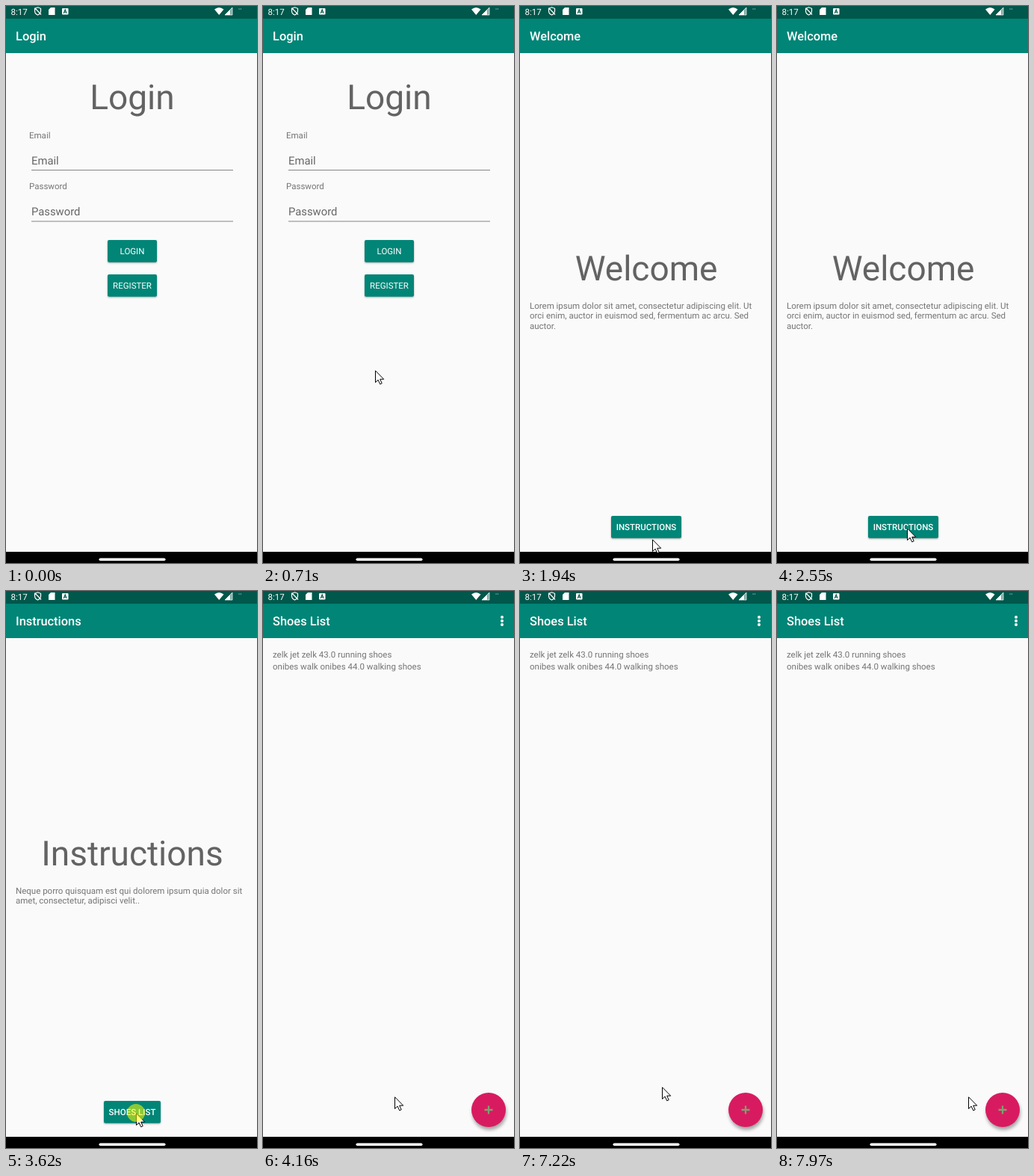
An HTML page that plays this animation: 336 px wide and 745 px high, repeating every 8 s.

```html
<!DOCTYPE html>
<html lang="en">
<head>
<meta charset="utf-8">
<title>Shoe store app</title>
<style>
  html, body { margin: 0; width: 100%; height: 100%; overflow: hidden; background: #fafafa; }
  svg { display: block; width: 336px; height: 745px; }
  text { font: 11.5px Roboto, sans-serif; fill: #757575; text-rendering: geometricPrecision; }
  .title { font-size: 16.4px; font-weight: 500; fill: #fff; }
  .headline { font-size: 46px; fill: #636363; text-anchor: middle; }
  .hint { font-size: 14.8px; fill: #666; }
  .label { fill: #fff; text-anchor: middle; }
  .raised { font-weight: 500; }
  .button { fill: #008577; filter: drop-shadow(0 1px 1px #0005); }
  .rule { stroke: #858585; }
  .fab { fill: #d81b60; filter: drop-shadow(1px 4px 2px #0005); }
</style>
</head>
<body>
<svg viewBox="0 0 336 745">
  <rect width="336" height="745" fill="#fafafa"/>
  <rect width="336" height="63" fill="#008577"/>
  <rect width="336" height="17" fill="#00574b"/>
  <rect y="730" width="336" height="15"/>
  <rect x="124.5" y="738.5" width="89" height="3.5" rx="1.75" fill="#fff"/>

  <g fill="#fff">
    <text x="6.5" y="11.5" style="fill:#fff">8:17</text>
    <path d="M42.5 1.8l4 1.5v3.5q0 3.5-4 5.2q-4-1.7-4-5.2v-3.5zM38.5 2.5l8.500 9" fill="none" stroke="#fff" stroke-width="1.2"/>
    <path d="M60 2h5.5v10h-8.500v-7z"/>
    <rect x="75" y="3" width="8.5" height="8.5" rx="1"/>
    <path d="M77.2 9.800l2-5 2 5M78 8.2h2.5" fill="none" stroke="#00574b" stroke-width="1.1"/>
    <path d="M279 4.5q6.300-5 12.500 0l-6.250 7.500z"/>
    <path d="M303 2v10h-10z" fill-opacity=".5" stroke="#fff" stroke-width=".7"/>
    <path d="M300 5v7h-7z"/>
    <path d="M311.5 4h3.5" stroke="#fff" stroke-width="2" stroke-opacity=".4" stroke-dasharray="1.2"/>
  </g>

  <g id="page"></g>
  <path id="cursor" d="M.5 .8v15.700l3.600-3.400 2.600 5.700 2.500-1.100-2.500-5.500h5z" fill="#fff" stroke="#000"/>
  <circle id="press" r="12" fill="#ff0" fill-opacity=".55"/>
</svg>
<script>
const LOOP = 8000, STEP = 70;
const MARGIN = 13, CENTER = 169, LINE = 13.4;

// Page building blocks
const text = (x, y, content, style = '') => `<text class="${style}" x="${x}" y="${y}">${content}</text>`;
const title = name => text(MARGIN, 46, name, 'title');
const paragraph = (y, gap, lines) => lines.map((line, i) => text(MARGIN, y + i * gap, line)).join('');

function button(label, y, width, style = '') {
  return `<rect class="button" x="${CENTER - width / 2}" y="${y - 15}" width="${width}" height="29.8" rx="2"/>`
    + text(CENTER, y + 4, label, 'label ' + style);
}

function field(name, y) {
  return text(31, y, name) + text(34, y + 35, name, 'hint')
    + `<path class="rule" d="M34 ${y + 43}h270"/>`;
}

function messagePage(name, lines, next, width) {
  return title(name) + text(CENTER, 366.5, name, 'headline')
    + paragraph(405, LINE, lines) + button(next, 697, width, 'raised');
}

const pages = [
  title('Login') + text(CENTER, 137.5, 'Login', 'headline')
    + field('Email', 176.5) + field('Password', 245)
    + button('LOGIN', 328, 66) + button('REGISTER', 374, 66),
  messagePage('Welcome', [
    'Lorem ipsum dolor sit amet, consectetur adipiscing elit. Ut',
    'orci enim, auctor in euismod sed, fermentum ac arcu. Sed',
    'auctor.',
  ], 'INSTRUCTIONS', 94),
  messagePage('Instructions', [
    'Neque porro quisquam est qui dolorem ipsum quia dolor sit',
    'amet, consectetur, adipisci velit..',
  ], 'SHOES LIST', 76),
  title('Shoes List')
    + '<path d="M320 35v11" stroke="#fff" stroke-width="4" stroke-linecap="round" stroke-dasharray="0 5"/>'
    + paragraph(89, 16, ['zelk jet zelk 43.0 running shoes', 'onibes walk onibes 44.0 walking shoes'])
    + '<circle class="fab" cx="302" cy="694" r="23"/>'
    + '<path d="M296.5 694h11M302 688.5v11" stroke="#80a071" stroke-width="2.3"/>',
];

// The pointer eases from target to target; bow bends the path sideways
const entry = { x: 289, y: 661 };
const legs = [
  { start: 370, end: 920, x: 177, y: 321, bow: -80 },
  { start: 1660, end: 1940, x: 177, y: 713, bow: -27 },
  { start: 2010, end: 2420, x: 174, y: 698, bow: 0 },
  { start: 3950, end: 4160, x: 176, y: 676, bow: 0 },
  { start: 5960, end: 5960, x: 178, y: 674, bow: 0 },
  { start: 7080, end: 7430, x: 200, y: 675, bow: -12 },
  { start: 7700, end: 7970, x: 256, y: 676, bow: -3 },
];
const clicks = [1120, 2480, 3620];

function pointerAt(t) {
  const index = legs.findLastIndex(leg => t >= leg.start);
  if (index < 0) return null;
  const leg = legs[index], from = legs[index - 1] ?? entry;
  const count = Math.round((leg.end - leg.start) / STEP) + 1;
  const step = t >= leg.end ? count : Math.floor((t - leg.start) / STEP) + 1;
  const p = Math.min(1, step / count), u = p * p * (3 - 2 * p);
  const dx = leg.x - from.x, dy = leg.y - from.y;
  const side = 4 * u * (1 - u) * leg.bow / Math.hypot(dx, dy);
  return [Math.round(from.x + u * dx - side * dy), Math.round(from.y + u * dy + side * dx)];
}

const [pageLayer, cursor, press] = ['page', 'cursor', 'press'].map(id => document.getElementById(id));
const origin = performance.now();
let shown;

function draw() {
  const t = (performance.now() - origin) % LOOP;
  const current = clicks.filter(c => t >= c + 2 * STEP).length;
  if (current !== shown) pageLayer.innerHTML = pages[shown = current];

  const point = pointerAt(t);
  const pressed = clicks.some(c => t >= c && t < c + STEP);
  cursor.style.display = point ? '' : 'none';
  press.style.display = pressed ? '' : 'none';
  if (point) for (const el of [cursor, press]) el.setAttribute('transform', `translate(${point})`);
  requestAnimationFrame(draw);
}
draw();
</script>
</body>
</html>
```
